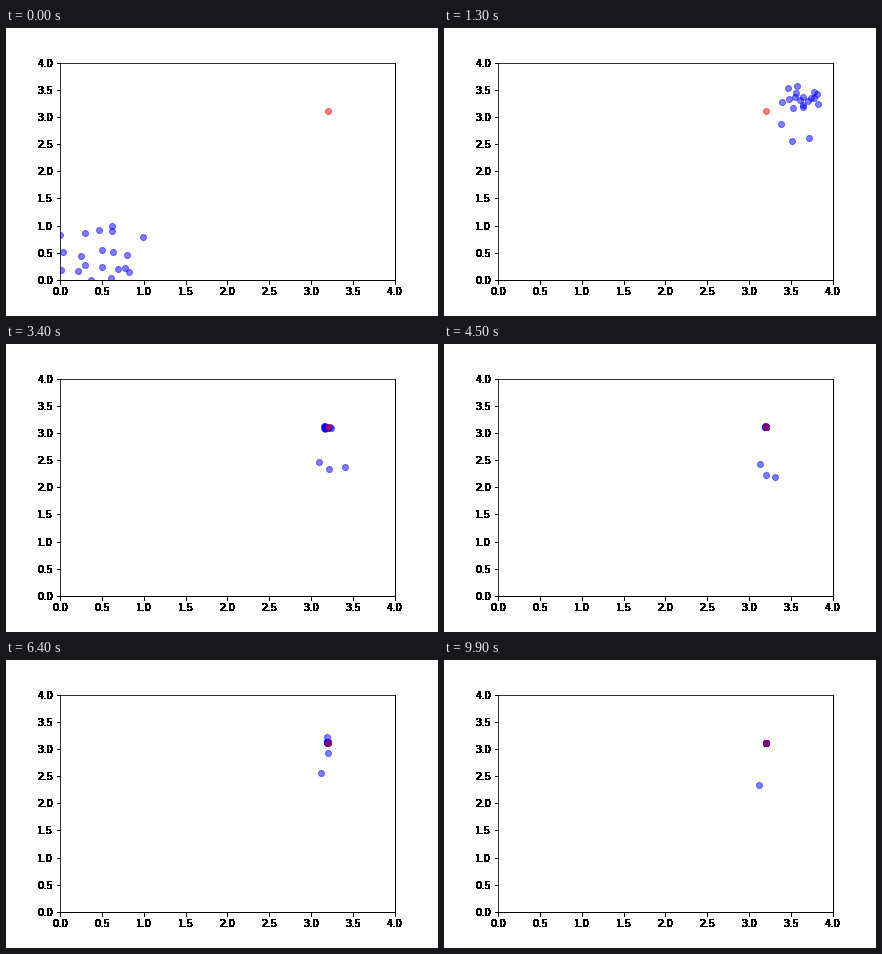
These frames come from a looping animation (432x288 px, 10000 ms). A matplotlib script:

```python
import numpy as np
import matplotlib.pyplot as plt
from matplotlib.animation import FuncAnimation

FRAMES, STEP = 100, 100
COUNT = 20
LIMIT = 4
GOAL = np.array([3.196, 3.118])


def swing(t, turn, decay=8):
    """Damped swing from 1 to 0 that first crosses zero at `turn`."""
    return np.exp(-t / decay) * np.cos(np.pi * t / (2 * turn))


def route(*keys):
    """Straight path through (step, x, y) keys that ends on the goal."""
    when, x, y = np.array([*keys, (77, *GOAL)]).T
    t = np.arange(FRAMES)
    return np.column_stack([np.interp(t, when, x), np.interp(t, when, y)])


def bobbing(x, y, period=13, peak=84):
    """Hover below the goal with a growing up and down motion."""
    t = np.arange(FRAMES)
    reach = 0.017 + 0.166 * (t / 90) ** 3
    wave = np.cos(2 * np.pi * (t - peak) / period)
    return np.column_stack([np.full(FRAMES, x), y - reach * wave])


def build_paths():
    """Positions as an array of particle, step and axis."""
    rng = np.random.default_rng(7)
    start = rng.random((COUNT, 1, 2))
    turn = rng.normal([8.2, 10], [1.2, 1.4], (COUNT, 1, 2))
    centre = np.tile(GOAL, (COUNT, FRAMES, 1))
    # Three stragglers circle elsewhere before they join the rest
    centre[-3] = bobbing(3.124, 2.474)
    centre[-2] = route((19, 3.04, 2.60), (34, 3.244, 2.364),
                       (45, 3.208, 2.235), (49, 3.18, 2.04),
                       (64, 3.208, 2.916))
    centre[-1] = route((19, 3.29, 2.38), (34, 3.435, 2.40),
                       (45, 3.303, 2.198), (60, 3.19, 3.256))
    t = np.arange(FRAMES)[None, :, None]
    return centre + (start - centre[:, :1]) * swing(t, turn)


def harden(img, dpi):
    """Turn soft edges solid black."""
    img[..., :3] = 0
    img[..., 3] = img[..., 3] > 0
    return img, 0, 0


plt.rcParams.update({"font.family": "DejaVu Sans", "font.size": 10})
fig = plt.figure(figsize=(6, 4), dpi=72, facecolor="white")
ax = fig.add_axes([0.125, 0.125, 0.775, 0.755])
ticks = np.arange(0, LIMIT + 0.1, 0.5)
ax.set(xlim=(0, LIMIT), ylim=(0, LIMIT), xticks=ticks, yticks=ticks)
for part in (ax.xaxis, ax.yaxis, ax.spines["right"], ax.spines["bottom"]):
    part.set_agg_filter(harden)

paths = build_paths()
dots, = ax.plot([], [], "bo", alpha=0.5)
ax.plot(*GOAL[:, None], "ro", alpha=0.5)


def update(n):
    dots.set_data(*paths[:, n].T)
    return dots,


anim = FuncAnimation(fig, update, frames=FRAMES, interval=STEP,
                     init_func=lambda: update(0), repeat=True, repeat_delay=0)
plt.show()
```
